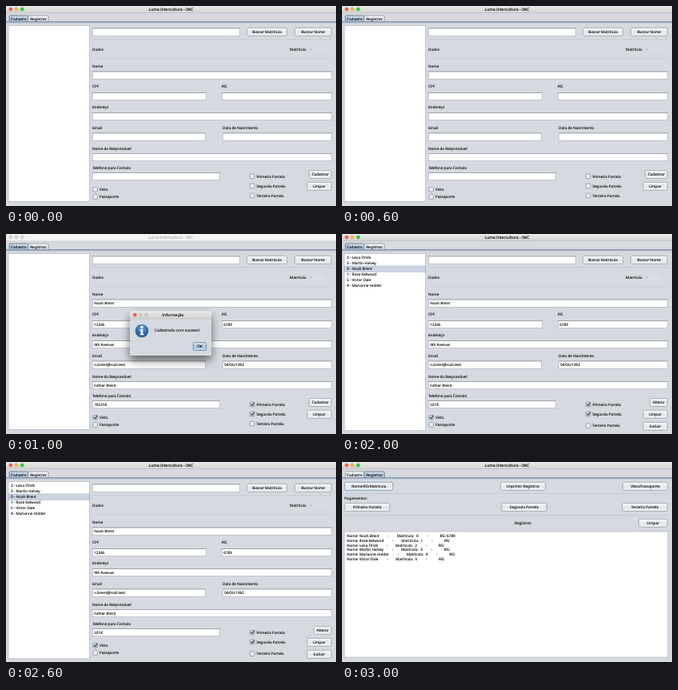
Recreate the animation shown at these times as an HTML page. Size 413 px wide and 250 px high, loop 4000 ms.

```html
<!DOCTYPE html>
<html lang="pt">
<head>
<meta charset="utf-8">
<style>
html, body { margin: 0; width: 100%; height: 100%; overflow: hidden; background: #d6d9df; }
svg { display: block; width: 413px; height: 250px; }
text { font: 4.65px "Noto Sans", "Open Sans", sans-serif; fill: #0a0a0a; stroke: #0a0a0a; stroke-width: .12; white-space: pre; text-rendering: geometricPrecision; }
.dim { fill: #999; stroke: none; }
.edge { stroke: #a4abb6; stroke-width: .6; }
</style>
</head>
<body>
<svg id="stage" viewBox="0 0 413 250">
  <defs>
    <linearGradient id="btn" x2="0" y2="1"><stop stop-color="#fafbfc"/><stop offset=".5" stop-color="#e3e6ea"/><stop offset="1" stop-color="#f0f2f5"/></linearGradient>
    <linearGradient id="blue" x2="0" y2="1"><stop stop-color="#dde7f1"/><stop offset=".5" stop-color="#afc5dc"/><stop offset="1" stop-color="#c6d8e9"/></linearGradient>
    <linearGradient id="bar" x2="0" y2="1"><stop stop-color="#ebebeb"/><stop offset="1" stop-color="#d2d2d2"/></linearGradient>
    <radialGradient id="info" cy=".3"><stop stop-color="#6fa3d8"/><stop offset="1" stop-color="#2a5d9c"/></radialGradient>
    <filter id="shadow" x="-30%" y="-40%" width="160%" height="200%"><feDropShadow dx="0" dy="6" stdDeviation="6" flood-opacity=".55"/></filter>
  </defs>
</svg>
<script>
const stage = document.getElementById('stage');

const rect = (x, y, w, h, fill, extra = '') =>
  `<rect x="${x}" y="${y}" width="${w}" height="${h}" fill="${fill}" ${extra}/>`;
// y is the vertical middle of the line
const text = (x, y, s, extra = '') => `<text x="${x}" y="${y + 1.65}" ${extra}>${s}</text>`;
const centered = (x, y, s, extra = '') => text(x, y, s, `text-anchor="middle" ${extra}`);
const title = (x, y, s, dim) => centered(x, y, s, `style="font-size:5px" ${dim ? 'class="dim"' : ''}`);
const box = (x, y, w, h) => rect(x, y, w, h, '#fff', 'class="edge"');
const rule = (x, y) => rect(x, y, 408 - x, .6, '#bfc4cc');

const button = (x, y, w, s, fill = 'btn', edge = '#8d95a1') =>
  rect(x + .3, y + .3, w - .6, 10, `url(#${fill})`, `rx="1.8" stroke="${edge}" stroke-width=".7"`) +
  centered(x + w / 2, y + 5.2, s);

const field = (x, y, w, s = '') => box(x + .3, y + .3, w - .6, 9.4) +
  rect(x + .3, y + .1, w - .6, .7, '#8b939f') + text(x + 2.2, y + 4.9, s);

const check = (x, y, s, on) =>
  rect(x + .4, y - 2.8, 5.6, 5.6, `url(#${on ? 'blue' : 'btn'})`, 'rx="1" stroke="#7f8794" stroke-width=".7"') +
  (on ? `<path d="M${x + 1.6} ${y - .3}l1.5 1.9 2.6-4.2" fill="none" stroke="#111" stroke-width=".9"/>` : '') +
  text(x + 8.4, y, s);

const dots = (x, y, colors) => colors.map((c, i) =>
  `<circle cx="${x + i * 7.2}" cy="${y}" r="2.3" fill="${c}" stroke="#0003" stroke-width=".4"/>`).join('');

const tab = (x, w, s, on) =>
  rect(x, 12, w, 7.8, `url(#${on ? 'blue' : 'btn'})`, `rx="1.2" stroke="${on ? '#3f5068' : '#7d8694'}" stroke-width=".7"`) +
  centered(x + w / 2, 15.9, s);

function frame(active, page) {
  return rect(0, 0, 413, 250, '#d6d9df') +
    rect(0, 0, 413, 8.6, active ? 'url(#bar)' : '#f3f3f3') +
    rect(0, 8.4, 413, .5, active ? '#b4b4b4' : '#d2d2d2') +
    dots(5.8, 4, active ? ['#fc605b', '#fdbc40', '#34c84a'] : Array(3).fill('#d8d8d8')) +
    title(206.5, 4.1, 'Luma Intercultura - IMC', !active) +
    tab(4.2, 23.3, 'Cadastro', page === 0) + tab(27.8, 25.2, 'Registros', page === 1) +
    rect(0, 19.3, 413, 1.6, '#a9bacd') + rect(0, 19.2, 413, .5, '#5b6b80') + rect(0, 20.8, 413, .4, '#8492a4');
}

const blank = { name: '', cpf: '', rg: '', street: '', mail: '', born: '', parent: '', phone: '' };
const student = {
  name: 'Noah Brent', cpf: '12345', rg: '6789', street: '9th Avenue', mail: 'n.brent@mail.test',
  born: '04/05/1992', parent: 'Father Brent', phone: '705318', on: true
};
const people = ['Noah Brent', 'Rose Kelwood', 'Lena Orvik', 'Martin Halvey', 'Marianne Holder', 'Victor Dale'];

function form(d, active, editing) {
  const labels = [
    [108, 54, 'Dados'], [355, 54, 'Matrícula'], [108, 75.5, 'Nome'], [108, 100, 'CPF'], [270, 100, 'RG'],
    [108, 126, 'Endereço'], [108, 152.5, 'Email'], [271, 152.5, 'Data de Nascimento'],
    [108, 178, 'Nome do Responsável'], [108, 202.3, 'Telefone para Contato']
  ];
  const list = editing ? rect(3.5, 40, 100.8, 7.2, '#ccd5e1', 'stroke="#8fabcd" stroke-width=".6"') +
    [2, 3, 0, 1, 5, 4].map((id, i) => text(6, 29.5 + i * 7.05, `${id} - ${people[id]}`)).join('') : '';
  return frame(active, 0) + box(3, 24.3, 101.5, editing ? 221.5 : 220) + list +
    field(108, 27.5, 185) + button(301, 27, 51, 'Buscar Matricula') + button(361, 27, 46.5, 'Buscar Nome') +
    rule(108, 41.5) + rule(108, 65.5) +
    labels.map(l => text(...l)).join('') +
    rect(377.3, 49.5, 23, 9, '#d9dce2', 'stroke="#cdd1d8" stroke-width=".5"') +
    text(380, 54.2, '0', 'class="dim"') +
    field(108, 81.6, 300, d.name) + field(108, 108, 143, d.cpf) + field(270, 108, 138, d.rg) +
    field(108, 133, 300, d.street) + field(108, 158.5, 142, d.mail) + field(271, 158.5, 137, d.born) +
    field(108, 184, 300, d.parent) + field(108, 208, 160, d.phone) +
    check(108.5, 229.3, 'Visto', d.on) + check(108.5, 238.5, 'Passaporte') +
    check(305, 213, 'Primeira Parcela', d.on) + check(305, 225, 'Segunda Parcela', d.on) +
    check(305, editing ? 239.7 : 237, 'Terceira Parcela') +
    (editing ? button(385, 205.3, 22.5, 'Alterar') + button(376.5, 235, 31, 'Excluir') : button(379, 205.3, 28.5, 'Cadastrar')) +
    button(376.5, 220, 31, 'Limpar');
}

const dialog = () => `<g filter="url(#shadow)">${rect(155, 96.5, 102, 55.5, '#d6d9df', 'rx="2"')}</g>` +
  rect(155, 96.5, 102, 9.5, 'url(#bar)', 'rx="2"') + rect(155, 105.7, 102, .5, '#b4b4b4') +
  dots(161.3, 101.1, ['#fc605b', '#cfcfcf', '#cfcfcf']) +
  title(209, 101.1, 'Informação') +
  '<circle cx="170" cy="121" r="8.7" fill="url(#info)" stroke="#e8eef5" stroke-width=".7"/>' +
  '<circle cx="170" cy="116.3" r="1.6" fill="#fff"/>' +
  '<path d="M167.6 119.3h3.7v5.6h1.4v1.4h-5.2v-1.4h1.3v-4.2h-1.2z" fill="#fff"/>' +
  text(186, 120.3, 'Cadastrado com sucesso!', 'style="font-size:4.75px"') +
  button(234, 135.3, 17, 'OK', 'blue', '#54779e');

function records() {
  const gap = n => ' '.repeat(n);
  const rows = people.map((p, i) => text(6, 92.5 + i * 5.75,
    `Nome: ${p}${gap(9)}-${gap(8)}Matricula:  ${i}${gap(9)}-${gap(12)}RG: ${i ? '' : student.rg}`));
  return frame(true, 1) +
    button(3, 25, 61, 'Nome/RG/Matricula', 'btn', '#5688b8') + button(198, 25, 57, 'Imprimir Registros') +
    button(351, 25, 57, 'Visto/Passaporte') + rule(3, 39) +
    text(3, 45.8, 'Pagamentos:') +
    button(3, 51.3, 57, 'Primeira Parcela') + button(199.5, 51.3, 57, 'Segunda Parcela') +
    button(350.5, 51.3, 57, 'Terceira Parcela') + rule(3, 66) +
    text(216, 76.2, 'Registros:') + button(371, 71, 36.5, 'Limpar') +
    box(3, 87, 405, 157) + rows.join('');
}

const scenes = [
  form(blank, true),
  form(student, false) + dialog(),
  form({ ...student, phone: '5318' }, true, true),
  records()
].map(markup => {
  const g = document.createElementNS('http://www.w3.org/2000/svg', 'g');
  g.innerHTML = markup;
  return stage.appendChild(g);
});

const start = performance.now();
function draw(now) {
  const current = Math.floor(Math.max(0, now - start) / 1000) % scenes.length;
  scenes.forEach((g, i) => g.style.display = i === current ? '' : 'none');
  requestAnimationFrame(draw);
}
draw(start);
</script>
</body>
</html>
```
